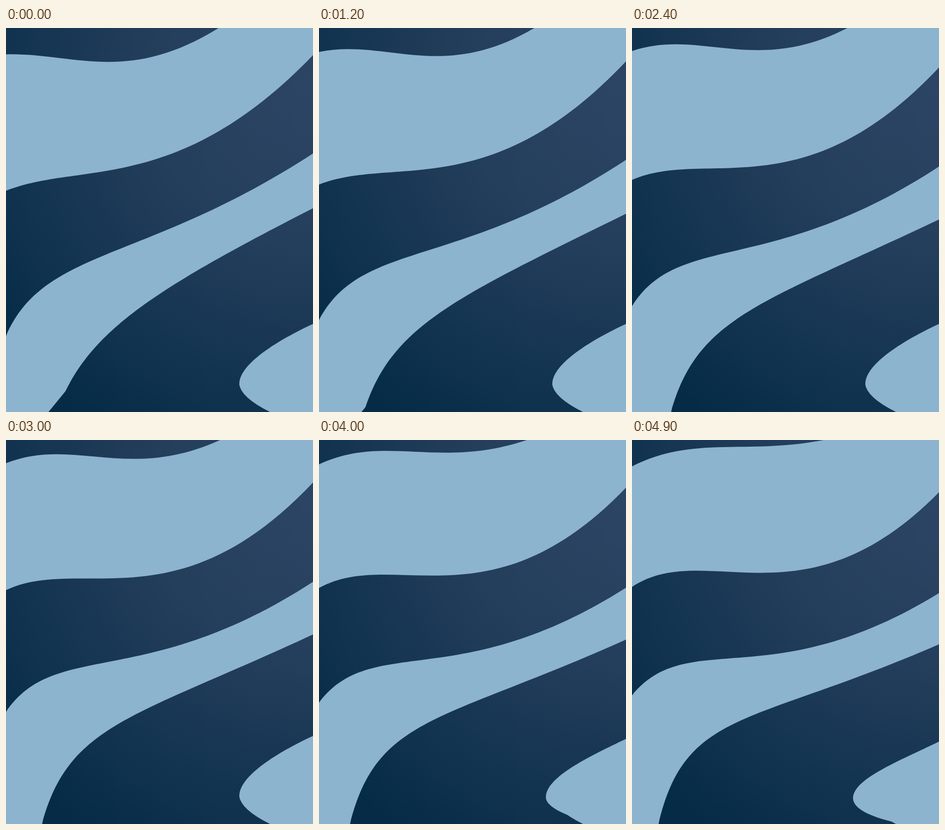
These frames come from a looping animation (600x750 px, 5 s). An HTML page with a canvas:

```html
<!DOCTYPE html>
<html lang="en">
<head>
<meta charset="utf-8">
<title>Flowing waves</title>
<style>
html, body { margin: 0; width: 100%; height: 100%; overflow: hidden; background: #8db4cf; }
canvas { display: block; width: 600px; height: 750px; }
</style>
</head>
<body>
<canvas id="stage" width="600" height="750"></canvas>
<script>
const ctx = document.getElementById('stage').getContext('2d');
const W = 600, H = 750, LOOP = 5000, STEP = 100, END = 4900, BLOB_START = 3000;
const LIGHT = '#8db4cf';

// A control point that drifts by (dx, dy) and sags by `sag` halfway
const drift = (x, y, dx = 0, dy = 0, sag = 0) => s =>
  [x + dx * s, y + dy * s + sag * 4 * s * (1 - s)];

// Each edge is one cubic Bezier curve with drifting control points
const topEdge = [
  drift(0, 51.5, 0, 0, -6.5), drift(140, 48, 0, -67, -18),
  drift(250, 119, 0, -75, 21), drift(450, -23, 0, 4, 5)
];
const upperEdge = [
  drift(0, 318, 0, -31, -6), drift(145, 260, 0, -69, 7),
  drift(335, 328, 0, 43, 10), drift(W, 53, 0, 49)
];
const middleEdge = [
  drift(0, 602, 0, -103, -8), drift(75, 428, 35, -64),
  drift(270, 460, 0, 42, 6), drift(W, 245, 0, 54, -1)
];
const lowerEdge = [
  drift(100, H, -48), drift(152, 600, -47, -75),
  drift(275, 518, -45, 42), drift(W, 352, 0, 47, -1)
];

const blobTip = drift(456, 695, -24, 5);
const blobTop = [drift(W, 578, 0, 11), drift(535, 608, -15, 20), drift(456, 655, -24, 7), blobTip];
const blobBottom = [blobTip, drift(456, 708, -24, 12), drift(480, 722, -12, 14), drift(510, 735, -3, 10)];

const pose = (edge, s) => edge.map(point => point(s));

function curve([a, b, c, d]) {
  ctx.lineTo(...a);
  ctx.bezierCurveTo(...b, ...c, ...d);
}

function fill(color, trace) {
  ctx.fillStyle = color;
  ctx.beginPath();
  trace();
  ctx.closePath();
  ctx.fill();
}

const dark = ctx.createRadialGradient(W, 120, 0, W, 120, 800);
[[0, '#2c4564'], [0.38, '#243f5c'], [0.55, '#1c3956'], [0.76, '#11334f'], [0.98, '#052b46']]
  .forEach(([at, color]) => dark.addColorStop(at, color));

function draw(t) {
  const s = t / END;
  ctx.fillStyle = dark;
  ctx.fillRect(0, 0, W, H);

  fill(LIGHT, () => {
    curve(pose(topEdge, s));
    ctx.lineTo(W, -30);
    curve(pose(upperEdge, s).reverse());
  });

  fill(LIGHT, () => {
    curve(pose(middleEdge, s).reverse());
    ctx.lineTo(0, H);
    curve(pose(lowerEdge, s));
  });

  // Fixed dark foot of the lower band
  fill(dark, () => {
    ctx.moveTo(83, H);
    ctx.lineTo(128, 695);
    ctx.lineTo(165, H);
  });

  // Corner blob with its fixed lower rim
  const p = Math.max(0, t - BLOB_START) / (END - BLOB_START);
  fill(LIGHT, () => {
    curve(pose(blobTop, p));
    curve(pose(blobBottom, p));
    ctx.lineTo(W, H);
  });
  fill(LIGHT, () => {
    ctx.moveTo(456, 695);
    ctx.quadraticCurveTo(458, 721, 516, H);
    ctx.lineTo(W, H);
    ctx.lineTo(W, 680);
  });
}

const start = performance.now();
function tick() {
  const t = (performance.now() - start) % LOOP;
  draw(Math.floor(t / STEP) * STEP);
  requestAnimationFrame(tick);
}
tick();
</script>
</body>
</html>
```
